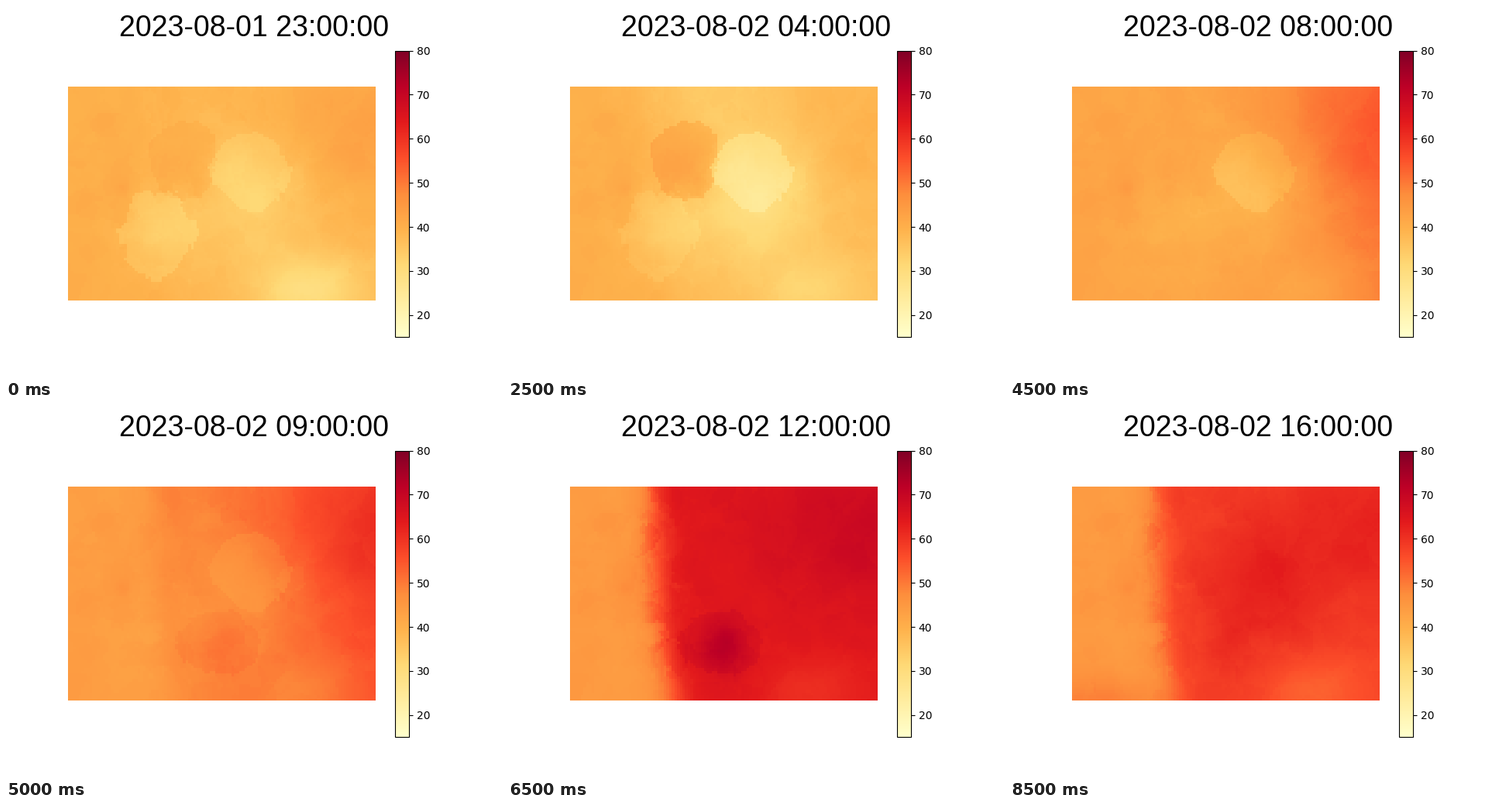
These frames come from a looping animation (640 by 480 pixels, 9 s). A matplotlib script:

```python
import numpy as np
import matplotlib.pyplot as plt
from matplotlib.animation import FuncAnimation

FRAMES, INTERVAL = 18, 500
COLS, ROWS = 115, 80
X0, X1, Y0, Y1 = 80, 477, 104, 380


def ease(t, a, b):
    """Smooth rise from 0 at a to 1 at b."""
    u = np.clip((t - a) / (b - a), 0, 1)
    return u * u * (3 - 2 * u)


def pulse(t, a, b, c, d):
    """Rise between a and b, fall between c and d."""
    return ease(t, a, b) - ease(t, c, d)


def patches(x, y, rng, count=320, near=3):
    """Three fields of angular patches: means over the nearest seeds."""
    seeds = rng.uniform((X0, Y0), (X1, Y1), (count, 2))
    values = rng.uniform(-1, 1, (count, 3))
    gap = np.hypot(x[..., None] - seeds[:, 0], y[..., None] - seeds[:, 1])
    idx = np.argpartition(gap, near, axis=-1)[..., :near]
    return np.moveaxis(values[idx].mean(axis=-2), -1, 0)


gx, gy = np.meshgrid(X0 + (np.arange(COLS) + 0.5) * (X1 - X0) / COLS,
                     Y0 + (np.arange(ROWS) + 0.5) * (Y1 - Y0) / ROWS)
dx, dy, grain = patches(gx, gy, np.random.default_rng(8))
x, y = gx + 10 * dx, gy + 10 * dy


def reach(cx, cy, rx, ry):
    return ((x - cx) / rx) ** 2 + ((y - cy) / ry) ** 2


def bump(*shape):
    return np.exp(-reach(*shape))


def disc(*shape):
    return (reach(*shape) < 1).astype(float)


# Parts of the map, in stage pixels
front = 188 + 0.18 * np.clip(y - 230, 0, 150)
inland = 0.5 + 0.5 * np.tanh((x - front) / 22)
east = np.clip((x - 250) / 230, 0, 1)
northeast = bump(480, 150, 160, 100)
north = bump(260, 110, 90, 50)
south = bump(390, 365, 70, 45)
southwest = bump(120, 385, 90, 35)
centre = bump(320, 243, 75, 85)
basin = disc(315, 216, 47, 51)
knoll = 0.5 * disc(230, 202, 47, 52) + 0.5 * bump(233, 210, 38, 38)
hollow_rim = disc(195, 295, 48, 55)
hollow = bump(195, 292, 45, 45)
pocket_rim = disc(274, 306, 52, 40)
pocket = bump(275, 312, 32, 32)
spot = bump(150, 238, 11, 11)


def field(h):
    """Temperature h hours after the first map."""
    dusk = ease(h, 0, 4)
    cool = 1 - ease(h, 6, 13)
    day = ease(h, 8.2, 13.4)
    late = ease(h, 13, 17)

    z = 40 + 4.5 * ease(h, 7, 11) + 1.2 * grain + 1.5 * spot
    z += inland * (20 * day - 7 * late - (2 + dusk) * cool)
    z += east * 8 * pulse(h, 7, 9, 9.5, 13)
    z += northeast * (5 - 3 * pulse(h, 0, 6, 7, 9))
    z -= north * 3 * pulse(h, 2, 6, 6.5, 9.5)
    z -= south * (8 - 5 * ease(h, 0, 7) + late)
    z += southwest * 5 * late
    z += centre * (4.5 * late - (5 + 3.5 * dusk) * cool)
    z -= basin * (2 + 2 * dusk) * cool
    z += knoll * (3 + 5 * ease(h, 0, 7)) * (1 - ease(h, 7, 9.5))
    z -= hollow_rim * 2.5 * (1 - ease(h, 3, 7.5))
    z -= hollow * 3.2 * cool
    z += pocket_rim * 1.5 * pulse(h, 8, 11, 13, 16)
    z += pocket * (7 * day - 5 * late)
    return z


def stamp(h):
    day, hour = divmod(23 + h, 24)
    return f"2023-08-{day + 1:02d} {hour:02d}:00:00"


fig, ax = plt.subplots(figsize=(6.4, 4.8), dpi=100)
image = ax.imshow(field(0), cmap="YlOrRd", vmin=15, vmax=80,
                  interpolation="nearest")
ax.axis("off")
fig.colorbar(image, ax=ax)
title = fig.text(0.5, 1 - 39 / 480, stamp(0), ha="center", va="baseline",
                 fontsize=27, family="Liberation Sans")


def update(i):
    image.set_data(field(i))
    title.set_text(stamp(i))
    return image, title


anim = FuncAnimation(fig, update, frames=FRAMES, interval=INTERVAL,
                     repeat=True, repeat_delay=0)
plt.show()
```
